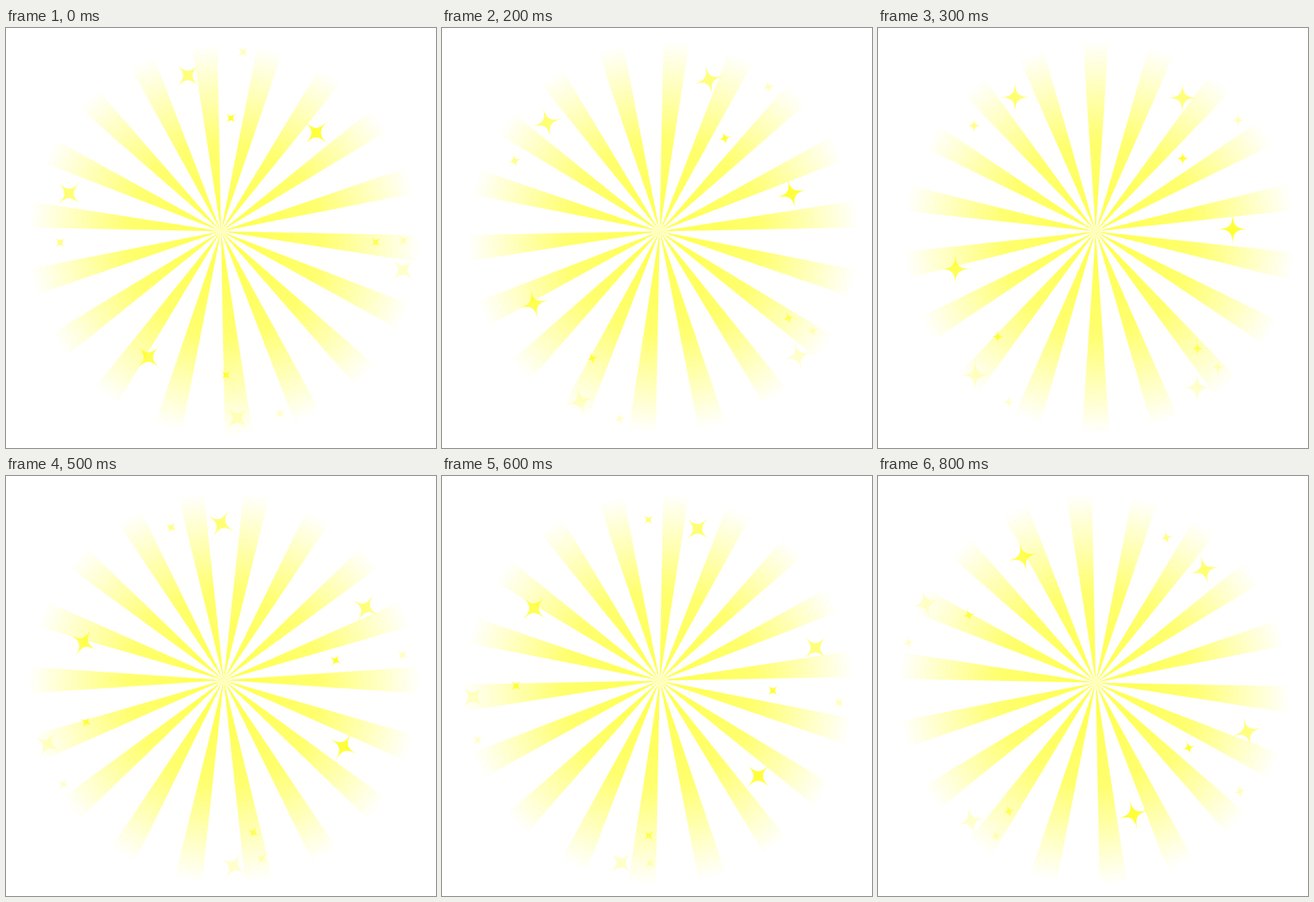
Recreate the animation shown at these times as an HTML page with a canvas. Size 640 by 625 pixels, loop 900 ms.

```html
<!DOCTYPE html>
<html>
<head>
<meta charset="utf-8">
<style>
  html, body { margin: 0; width: 100%; height: 100%; overflow: hidden; background: #fff; }
  canvas { display: block; }
</style>
</head>
<body>
<canvas id="stage" width="640" height="625"></canvas>
<script>
const ctx = document.getElementById('stage').getContext('2d');
const RAD = Math.PI / 180;
const STEP_MS = 100, STEPS = 9, TURN_PER_STEP = 15;
const RAYS = 18, RAY_HALF_ANGLE = 3.9, RAY_LENGTH = 320, GLOW_RADIUS = 292;

// Star positions: angle clockwise from the top, distance from the hub
const starGroups = [
  { size: 25, places: [[-76, 233], [-12, 237], [44, 204], [102, 277], [175, 279], [210, 216]] },
  { size: 12, places: [[-94, 240], [5, 169], [7, 269], [93, 272], [94, 231], [162, 285], [178, 214]] }
];

const yellow = alpha => `rgba(255,255,0,${alpha})`;

const polar = (centre, angle, distance) => ({
  x: centre.x + distance * Math.sin(angle * RAD),
  y: centre.y - distance * Math.cos(angle * RAD)
});

// The hub drifts slightly while the glow circles around its own middle.
const hubAt = step => ({
  x: 324 - Math.max(0, 4 - 2 * step),
  y: 302.5 + 5 * (step / (STEPS - 1)) ** 3
});

function glowAt(step) {
  const sway = Math.cos((step - 2.5) / STEPS * 2 * Math.PI);
  return { x: 325.5 + 4.5 * sway, y: 314.5 - 3.5 * sway };
}

function drawRays(hub, glow, turn) {
  const fill = ctx.createRadialGradient(glow.x, glow.y, 0, glow.x, glow.y, GLOW_RADIUS);
  fill.addColorStop(0, yellow(.7));
  fill.addColorStop(.5, yellow(.56));
  fill.addColorStop(1, yellow(0));
  ctx.fillStyle = fill;
  ctx.beginPath();
  for (let i = 0; i < RAYS; i++) {
    const angle = turn - 5 + i * 360 / RAYS;
    ctx.moveTo(hub.x, hub.y);
    for (const side of [-1, 1]) {
      const end = polar(hub, angle + side * RAY_HALF_ANGLE, RAY_LENGTH);
      ctx.lineTo(end.x, end.y);
    }
    ctx.closePath();
  }
  ctx.fill();
}

function drawStar(hub, turn, size, [angle, distance]) {
  const centre = polar(hub, angle + turn, distance);
  const waist = size * .2;
  ctx.save();
  ctx.translate(centre.x, centre.y);
  ctx.rotate((turn - 45) * RAD);
  ctx.beginPath();
  for (let i = 0; i < 4; i++) {
    ctx.lineTo(size, 0);
    ctx.bezierCurveTo(waist, 0, 0, waist, 0, size);
    ctx.rotate(90 * RAD);
  }
  // Stars fade with their distance from the hub
  ctx.fillStyle = yellow(Math.min(.8, Math.max(.2, .8 - (distance - 200) * .0079)));
  ctx.fill();
  ctx.restore();
}

function draw() {
  const step = Math.floor(performance.now() / STEP_MS) % STEPS;
  const turn = step * TURN_PER_STEP;
  const hub = hubAt(step);
  ctx.clearRect(0, 0, 640, 625);
  drawRays(hub, glowAt(step), turn);
  for (const { size, places } of starGroups)
    for (const place of places) drawStar(hub, turn, size, place);
  requestAnimationFrame(draw);
}
draw();
</script>
</body>
</html>
```
